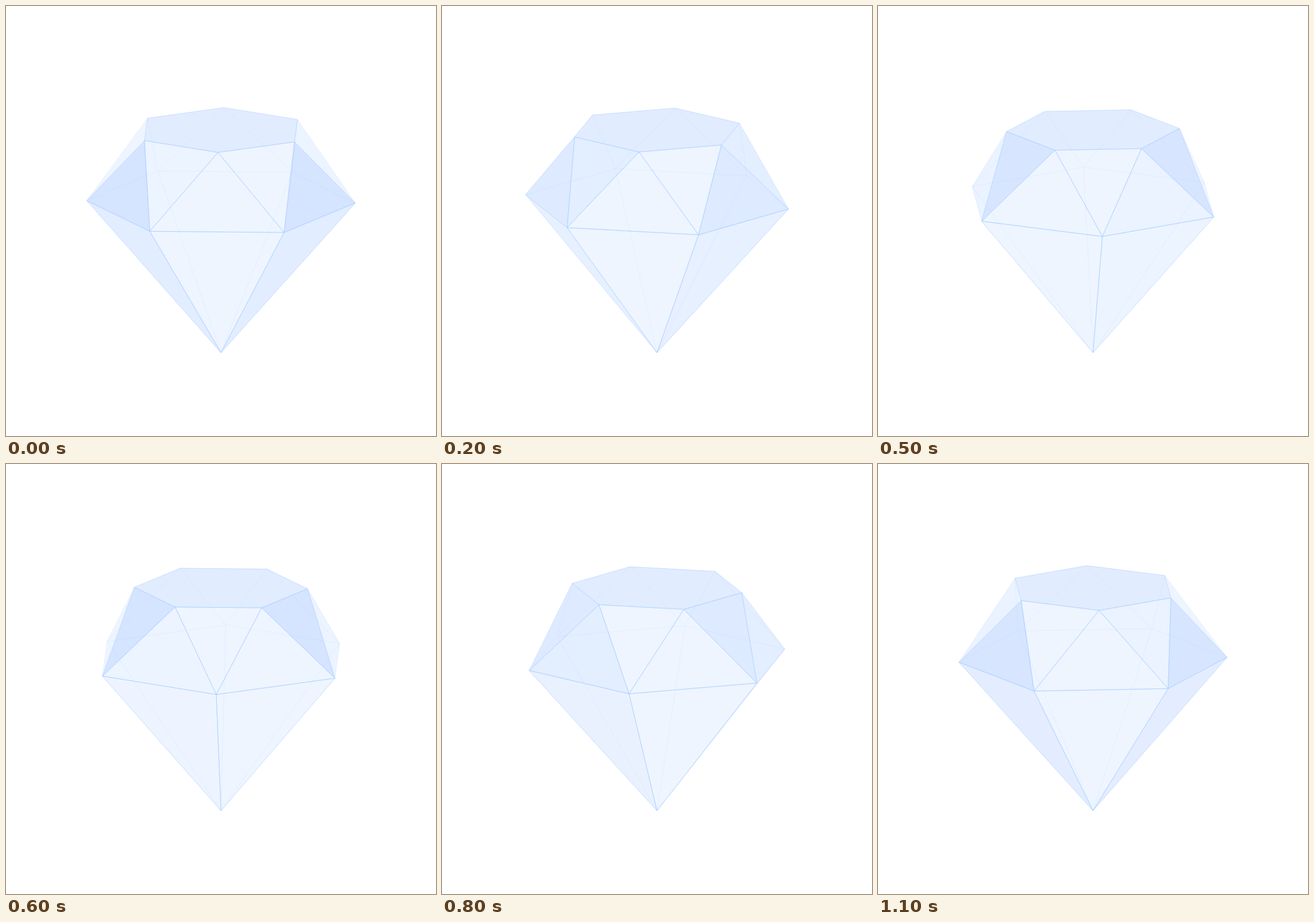
An HTML page with a canvas for the animation above (1200 ms loop, 640x640 px).

```html
<!DOCTYPE html>
<html lang="en">
<head>
<meta charset="utf-8">
<title>Turning gem</title>
<style>
  html, body { margin: 0; height: 100%; overflow: hidden; background: #fff; }
  canvas { display: block; }
</style>
</head>
<body>
<canvas id="stage" width="640" height="640"></canvas>
<script>
const ctx = document.getElementById('stage').getContext('2d');
const RAD = Math.PI / 180;
const TILT = Math.sin(15 * RAD);
const APEX = [320, 516];
const LIGHT = [238, 245, 255], CROWN = [211, 227, 255], PALE = [225, 236, 255];
const clamp = v => Math.max(0, Math.min(1, v));

const ring = (radius, y, deg) => [
  320 + radius * Math.cos(deg * RAD),
  y + radius * TILT * Math.sin(deg * RAD)
];
const girdle = deg => ring(200, 291.4, deg);
const table = deg => ring(129, 184.6, deg);

function mix(a, b, t) {
  return `rgb(${a.map((v, i) => Math.round(v + (b[i] - v) * t))})`;
}

// Shade and outline depend on how far a facet is turned from the viewer.
function facet(points, mid, dark) {
  const turn = Math.acos(Math.sin(mid * RAD)) / RAD;
  return {
    points,
    fill: mix(LIGHT, dark, clamp(1 - Math.abs(turn - 60) / 30)),
    edge: 0.08 + 0.4 * clamp((90 - turn) / 30)
  };
}

function gem(angle) {
  const corners = [0, 1, 2, 3, 4, 5].map(i => angle + i * 60);
  const facets = [{
    points: corners.map(a => table(a + 30)),
    fill: mix(PALE, PALE, 0),
    edge: 0.4
  }];
  for (const a of corners) {
    const mid = a + 30, next = a + 60;
    facets.push(
      facet([girdle(a), girdle(next), table(mid)], mid, CROWN),
      facet([table(mid + 60), table(mid), girdle(next)], next, CROWN),
      facet([girdle(next), girdle(a), APEX], mid, PALE)
    );
  }
  return facets;
}

function facesViewer({ points: [a, b, c] }) {
  return (b[0] - a[0]) * (c[1] - a[1]) > (b[1] - a[1]) * (c[0] - a[0]);
}

function trace(points) {
  ctx.beginPath();
  points.forEach(p => ctx.lineTo(...p));
  ctx.closePath();
}

function outline(f, alpha) {
  trace(f.points);
  ctx.strokeStyle = `rgba(160,200,255,${alpha})`;
  ctx.stroke();
}

function draw() {
  // Ten poses a second, taken from a turn that advances 2° every 40 ms.
  const time = Math.floor(performance.now() % 1200 / 100) * 100;
  const facets = gem(2 + 2 * Math.floor(time / 40));
  const front = facets.filter(facesViewer);
  const back = facets.filter(f => !facesViewer(f));

  ctx.clearRect(0, 0, 640, 640);
  ctx.lineWidth = 1;
  ctx.lineJoin = 'round';
  for (const f of front) {
    trace(f.points);
    ctx.fillStyle = f.fill;
    ctx.fill();
  }
  back.forEach(f => outline(f, 0.08));
  front.forEach(f => outline(f, f.edge));
  requestAnimationFrame(draw);
}
draw();
</script>
</body>
</html>
```
